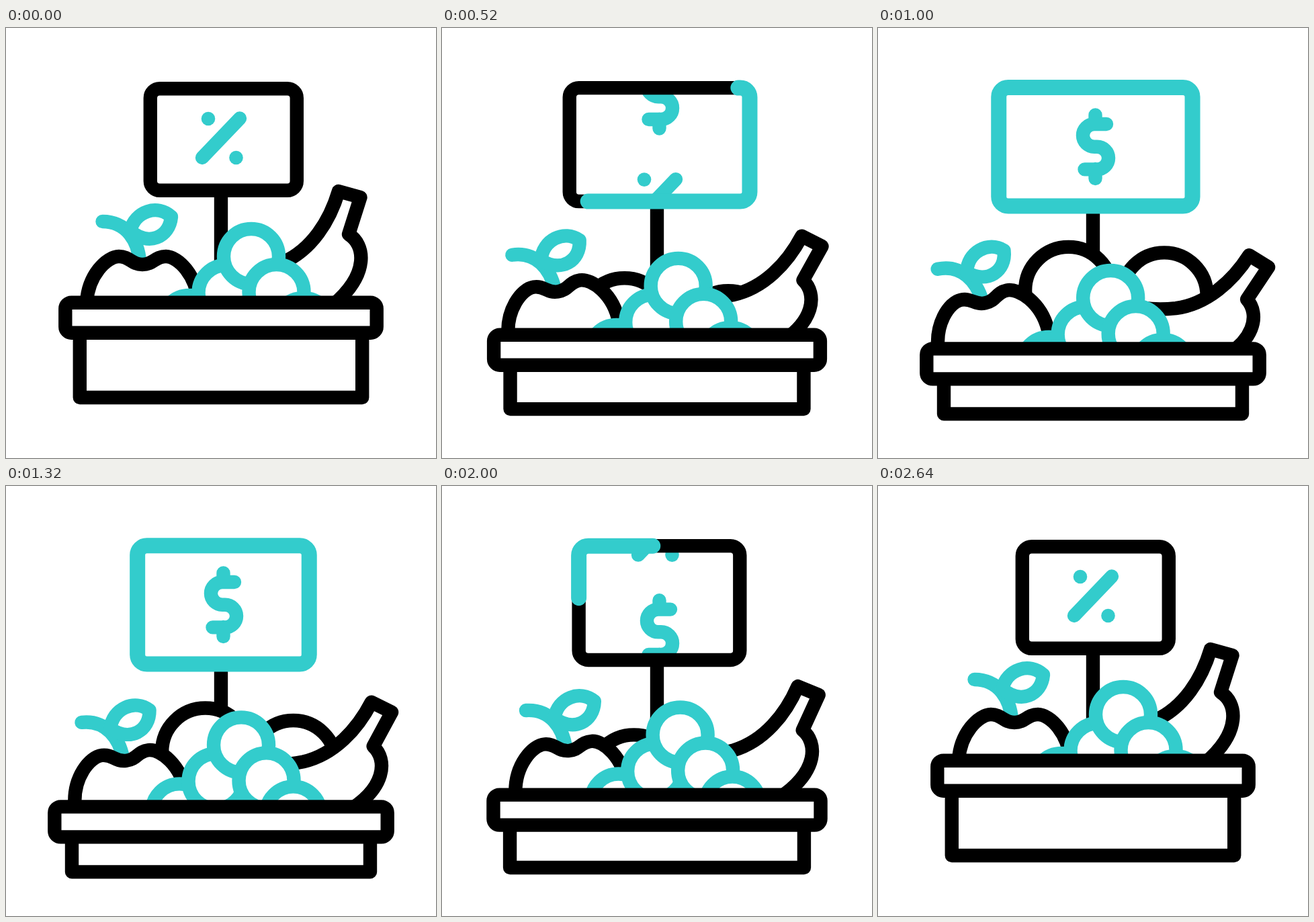
Write an HTML page with a canvas that moves like this. It is 640 px wide and 640 px high and loops after 3000 ms.

```html
<!DOCTYPE html>
<html lang="en">
<head>
<meta charset="utf-8">
<title>Fruit stand</title>
<style>
  html, body { margin: 0; height: 100%; overflow: hidden; background: #fff; }
  canvas { display: block; width: 640px; height: 640px; }
</style>
</head>
<body>
<canvas id="stage" width="640" height="640"></canvas>
<script>
const ctx = document.getElementById('stage').getContext('2d');
const TEAL = '#33cccc', BLACK = '#000', LOOP = 3000, STEP = 40, LINE = 20.4;

const apple = new Path2D('M125 450Q119 430 120 409C122 368 150 340 168 340C185 340 186 352 203 352C220 352 221 340 238 340C256 340 284 368 286 409Q287 430 281 450');
const stem = new Path2D('M143.5 288C180 288 197 318 199 348');
const leaf = new Path2D('M185 302C192 272 226 262 246 281C243 312 212 325 185 302Z');
const banana = new Path2D('M365 362C380 360 395 356 412 349C455 330 482 287 495 243L527.5 252L510 307C534 322 542 365 487 412L470 430H380');
const dollar = new Path2D('M340 143H322A17 16.8 0 0 0 322 176.7H326A17 16.8 0 0 1 326 210.4H307.5M323.5 129.5V143M323.5 210V224');
const slash = new Path2D('M292 193L348 134.5');
const grapes = [[-92, 99], [-37.5, 54], [0, 0], [37.5, 53], [77.5, 103]];

const lerp = (a, b, k) => a + (b - a) * k;
const ease = (t, from, to) => {
  const u = Math.min(1, Math.max(0, (t - from) / (to - from)));
  return u * u * (3 - 2 * u);
};

function stroke(path, color = BLACK, fill = null, width = LINE) {
  if (fill) { ctx.fillStyle = fill; ctx.fill(path); }
  ctx.strokeStyle = color;
  ctx.lineWidth = width;
  ctx.stroke(path);
}

function disc(x, y, r, color, fill) {
  const path = new Path2D();
  path.arc(x, y, r, 0, 7);
  stroke(path, color, fill);
}

function dot(x, y) {
  ctx.fillStyle = TEAL;
  ctx.beginPath();
  ctx.arc(x, y, 10.3, 0, 7);
  ctx.fill();
}

// Moves the local point (px, py) to (x, y) and turns the drawing about it.
function placed(px, py, x, y, degrees, draw) {
  ctx.save();
  ctx.translate(x, y);
  ctx.rotate(degrees * Math.PI / 180);
  ctx.translate(-px, -py);
  draw();
  ctx.restore();
}

function drawSign(t, mix) {
  const x0 = mix(214.8, 179, 199.7), x1 = mix(432.8, 468.8, 447);
  const y0 = mix(90.2, 88.6, 88.8), y1 = mix(241.8, 265, 265), r = 14;

  stroke(new Path2D(`M320 ${y1}V470`));

  // Counter-clockwise outline, so the teal line can run along it.
  const frame = new Path2D();
  frame.moveTo(x0, y0 + r);
  frame.arcTo(x0, y1, x1, y1, r);
  frame.arcTo(x1, y1, x1, y0, r);
  frame.arcTo(x1, y0, x0, y0, r);
  frame.arcTo(x0, y0, x0, y1, r);
  frame.closePath();
  ctx.fillStyle = '#fff';
  ctx.fill(frame);

  ctx.save();
  ctx.clip(frame);
  const enter = ease(t, 195, 805), leave = ease(t, 1774, 2384);
  const percentY = t < 1400 ? 165 * enter : -131 * (1 - leave);
  const dollarY = t < 1400 ? -165 * (1 - enter) : 131 * leave;
  placed(0, 0, 0, percentY, 0, () => {
    stroke(slash, TEAL);
    dot(301, 135);
    dot(342.5, 193);
  });
  placed(0, 0, 0, dollarY, 0, () => stroke(dollar, TEAL));
  ctx.restore();

  stroke(frame);
  const length = t < 1400 ? ease(t, 223, 827) : 1 - ease(t, 1591, 2184);
  if (length <= 0) return;
  const perimeter = 2 * (x1 - x0 + y1 - y0) - 8 * r + 2 * Math.PI * r;
  const tail = t < 1400 ? 0.13 + 0.00026 * (t - 223) : 0.9 + 0.00044 * (t - 1591) - length;
  if (length < 1) {
    ctx.setLineDash([length * perimeter, (1 - length) * perimeter]);
    ctx.lineDashOffset = -tail * perimeter;
  }
  stroke(frame, TEAL, null, 23);
  ctx.setLineDash([]);
}

function drawFruit(mix, top) {
  ctx.save();
  ctx.beginPath();
  ctx.rect(0, 0, 640, top + 8);
  ctx.clip();

  disc(mix(245, 283, 300), top + mix(147, -77, -71), 64.5, BLACK, '#fff');
  disc(mix(426, 426, 428), top + mix(190, -70, -51), 63.5, BLACK, '#fff');

  placed(143, 288, mix(143, 87, 118), top + mix(-110.5, -108, -117), mix(0, -12, -5), () => {
    ctx.fillStyle = '#fff';
    ctx.fill(apple);
    stroke(stem, TEAL);
    stroke(leaf, TEAL, '#fff');
    stroke(apple);
  });

  placed(510, 307, mix(510, 549.2, 546), top + mix(-91.5, -62.5, -84), mix(0, 16.3, 9.4),
    () => stroke(banana, BLACK, '#fff'));

  const gx = mix(365, 346, 351), gy = top + mix(-58.5, -64.5, -86);
  for (const [dx, dy] of grapes) disc(gx + dx, gy + dy, 41, TEAL, '#fff');
  ctx.restore();
}

function drawTray(mix, top) {
  const left = mix(109.8, 98, 98), right = mix(530.2, 542, 542), bottom = mix(550, 574.4, 574.4);
  stroke(new Path2D(`M${left} ${top + 55}V${bottom}H${right}V${top + 55}`), BLACK, '#fff');
  const x = mix(88.3, 72.3, 72.3), strip = new Path2D();
  strip.roundRect(x, top + 10.2, 640 - 2 * x, 45, 9);
  stroke(strip, BLACK, '#fff');
}

function render(t) {
  const spread = ease(t, 124, 746), settle = ease(t, 940, 1470), back = ease(t, 1680, 2640);
  // Rest pose, spread pose, settled pose, then back to rest.
  const mix = (a, b, c) => lerp(lerp(lerp(a, b, spread), c, settle), a, back);
  const top = mix(398.5, 467.2, 467.2);
  ctx.fillStyle = '#fff';
  ctx.fillRect(0, 0, 640, 640);
  ctx.lineCap = ctx.lineJoin = 'round';
  drawSign(t, mix);
  drawFruit(mix, top);
  drawTray(mix, top);
}

function tick() {
  const t = performance.now() % LOOP;
  render(Math.floor(t / STEP) * STEP);
  requestAnimationFrame(tick);
}
tick();
</script>
</body>
</html>
```
